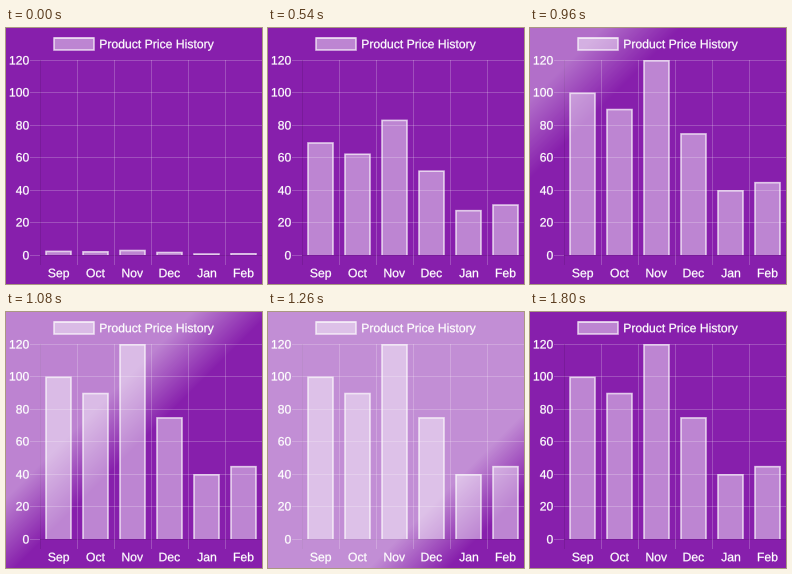
Recreate the animation shown at these times as a matplotlib script. Size 256x256 px, loop 2610 ms.

```python
import numpy as np
import matplotlib.pyplot as plt
from matplotlib.animation import FuncAnimation
from matplotlib.patches import PathPatch, Rectangle
from matplotlib.textpath import TextPath
from matplotlib.transforms import Affine2D

SIZE, DPI = 256, 100
FRAMES, STEP = 87, 30
PURPLE = "#871fac"
GLASS = (1, 1, 1, 0.46)
EDGE = (1, 1, 1, 0.7)
GRID = (1, 1, 1, 0.21)
AXIS = (0, 0, 0, 0.1)

MONTHS = ["Sep", "Oct", "Nov", "Dec", "Jan", "Feb"]
PRICES = [100, 90, 120, 75, 40, 45]
LEFT, TOP, BASE = 34, 32, 227
COL, BAR_W = 37, 26.6
UNIT = (BASE - TOP) / 120

plt.rcParams["font.family"] = "Liberation Sans"


def ease(x):
    """CSS ease-in-out, cubic-bezier(.42, 0, .58, 1)."""
    x = min(max(x, 0), 1)
    lo, hi = 0.0, 1.0
    for _ in range(30):
        s = (lo + hi) / 2
        if 1.26 * s * (1 - s) ** 2 + 1.74 * s * s * (1 - s) + s ** 3 < x:
            lo = s
        else:
            hi = s
    return s * s * (3 - 2 * s)


fig = plt.figure(figsize=(SIZE / DPI, SIZE / DPI), dpi=DPI, facecolor=PURPLE)
ax = fig.add_axes([0, 0, 1, 1])
ax.axis("off")


def label(x, y, text, align=0.0):
    """Outlined glyphs on baseline y; align 0 is left, 0.5 centre, 1 right."""
    path = TextPath((0, 0), text, size=12.2)
    box = path.get_extents()
    shift = x - box.x0 - align * box.width
    place = Affine2D().scale(1, -1).translate(shift, y) + ax.transData
    ax.add_patch(PathPatch(path, fc="white", ec="white", lw=0.25 * 72 / DPI,
                           transform=place, zorder=4, snap=False))


def line(xs, ys, color=GRID, width=1, zorder=1):
    return ax.plot(xs, ys, color=color, lw=width * 72 / DPI, zorder=zorder,
                   solid_capstyle="butt", solid_joinstyle="miter",
                   snap=False)[0]


def panel(x, y, w, h):
    return ax.add_patch(Rectangle((x, y), w, h, fc=GLASS, ec="none",
                                  zorder=2, snap=False))


# Grid and tick labels
for value in range(0, 121, 20):
    y = np.floor(BASE - value * UNIT) + 0.5
    line([24, LEFT], [y, y])
    line([LEFT, SIZE], [y, y], GRID if value else AXIS)
    label(22.8, y + 4, str(value), 1)

for i, month in enumerate(MONTHS):
    x = LEFT + i * COL + 0.5
    line([x, x], [TOP, 237], GRID if i else AXIS)
    label(x + COL / 2 - 0.3, 249.2, month, 0.5)

# Legend
panel(48, 10, 40, 12)
line([48, 88, 88, 48, 48, 88], [10, 10, 22, 22, 10, 10], EDGE, 1.6, 3)
label(94.2, 20.2, "Product Price History")

# Bars have an outline on three sides only
bars = []
for i, price in enumerate(PRICES):
    x = LEFT + (i + 0.5) * COL - BAR_W / 2 + 0.8
    fill = panel(x, BASE, BAR_W - 1.6, 0)
    rim = line([], [], EDGE, 1.6, 3)
    bars.append((x, x + BAR_W - 1.6, price, fill, rim))

# Glare: a soft diagonal front crossing from the top left corner
px, py = np.meshgrid(np.arange(SIZE) + 0.5, np.arange(SIZE) + 0.5)
depth = px + py
glare = np.ones((SIZE, SIZE, 4))
sheen = ax.imshow(glare, extent=(0, SIZE, SIZE, 0), aspect="auto",
                  interpolation="nearest", zorder=5)
ax.set_xlim(0, SIZE)
ax.set_ylim(SIZE, 0)


def update(n):
    t = n * STEP
    grow = ease((n + 4.2) / 36)
    for x0, x1, price, fill, rim in bars:
        h = price * UNIT * grow
        y = min(BASE - h + 0.8, BASE)
        fill.set_y(y)
        fill.set_height(BASE - y)
        rim.set_data([x0, x0, x1, x1], [BASE, y, y, BASE])

    front = 0.95 * (t - 800)
    alpha = 0.5 * ease((t - 450) / 800) * (1 - ease((t - 1380) / 320))
    glare[..., 3] = alpha * np.clip((front - depth) / 80, 0, 1)
    sheen.set_data(glare)
    return [sheen]


anim = FuncAnimation(fig, update, frames=FRAMES, interval=STEP,
                     repeat=True, repeat_delay=0, blit=False)
plt.show()
```
